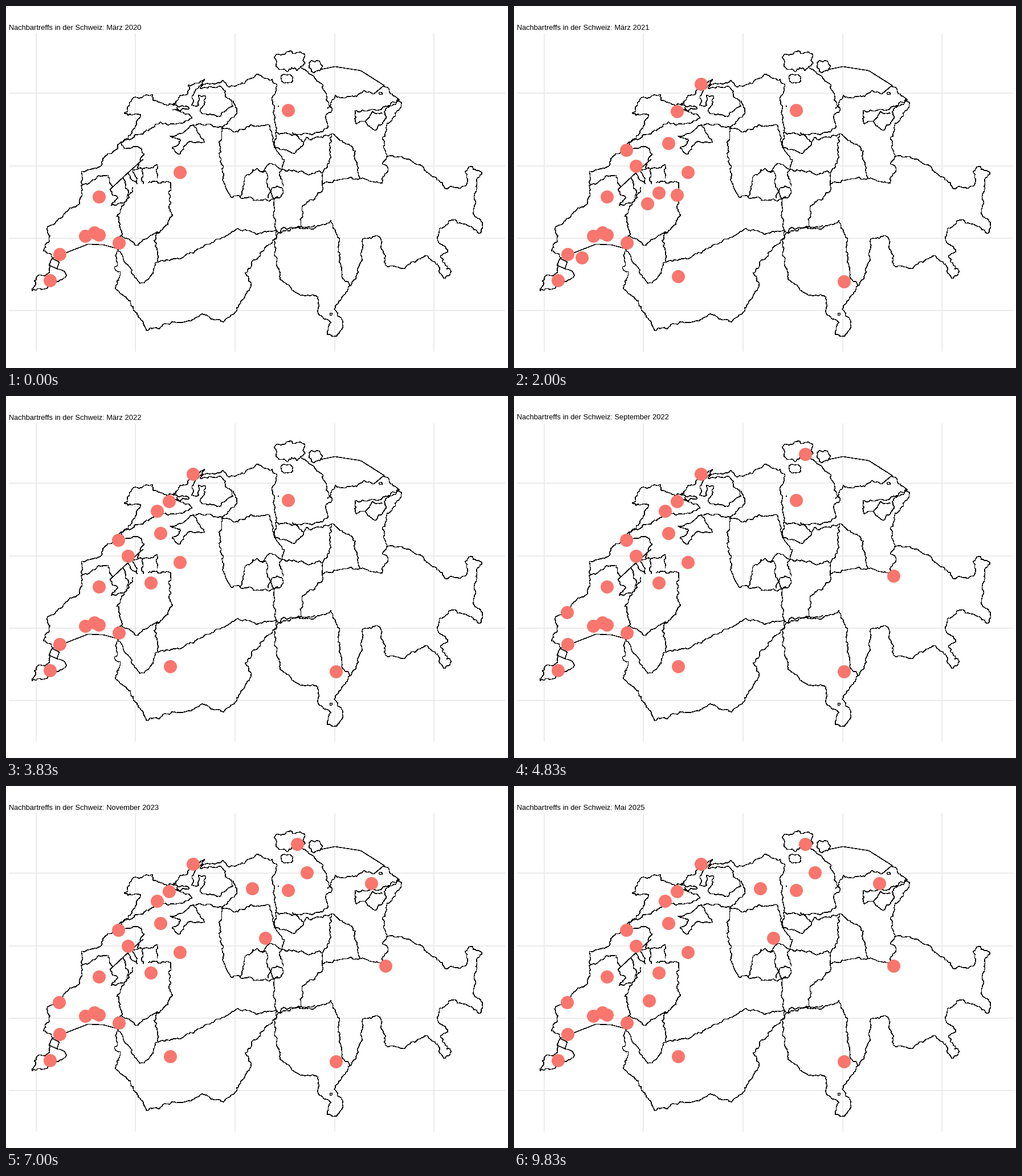
A matplotlib script for the animation above (10 s loop, 881 px wide and 636 px high).

```python
import matplotlib.pyplot as plt
import numpy as np
from matplotlib.animation import FuncAnimation
from matplotlib.collections import LineCollection

W, H, DPI = 881, 636, 100
TICKS, TICK_MS = 200, 50
STEPS = 60       # map updates per loop
LAST_MONTH = 62  # months from March 2020 to May 2025
PX = 72 / DPI
MONTHS = ("Januar Februar März April Mai Juni Juli August "
          "September Oktober November Dezember").split()

rng = np.random.default_rng(4)
paths = []


def meander(a, b):
    """Midpoint displacement from a to b, without the end point."""
    d = b - a
    length = np.hypot(*d)
    if length < 3.5:
        return [a]
    shift = np.clip(rng.normal(0, 0.16), -0.3, 0.3) * min(length, 11)
    mid = (a + b) / 2 + shift * np.array([-d[1], d[0]]) / length
    return meander(a, mid) + meander(mid, b)


def smooth(*xy):
    paths.append(np.array(xy, float).reshape(-1, 2) + 0.5)


def border(*xy):
    pts = np.array(xy, float).reshape(-1, 2)
    line = [p for a, b in zip(pts, pts[1:]) for p in meander(a, b)]
    smooth(*np.ravel(line + [pts[-1]]))


def blob(cx, cy, rx, ry, rough=0.12):
    """A closed district outline: an ellipse with a wobbling radius."""
    t = np.linspace(0, 2 * np.pi, 9 + (rx + ry) // 3)
    r = 1 + rng.uniform(-rough, rough, t.size)
    r[-1] = r[0]
    border(*np.ravel(np.column_stack([cx + rx * r * np.cos(t), cy + ry * r * np.sin(t)])))


# Geneva, Vaud, Neuchâtel
border(77, 454, 72, 470, 53, 476, 45, 500, 72, 495, 104, 477, 103, 468, 89, 461)
smooth(80, 443, 93, 449, 89, 461, 75, 455, 80, 443)
smooth(84, 442, 105, 433, 143, 418, 170, 419, 196, 426)
border(84, 442, 65, 430, 77, 403, 72, 388, 128, 342, 132, 290, 160, 284,
       174, 263, 205, 238)
border(131, 316, 165, 299, 179, 297, 187, 317)
smooth(182, 322, 213, 293, 240, 269)
border(205, 238, 207, 250, 233, 248, 242, 260, 230, 284, 265, 278, 265, 302)
border(182, 322, 196, 337, 184, 350, 206, 346, 215, 325, 205, 302)
border(213, 293, 230, 312, 222, 288, 240, 285, 241, 312)

# Fribourg and Valais
border(222, 318, 193, 369, 203, 402, 228, 420, 270, 396, 292, 367, 285, 326,
       289, 310, 249, 310)
border(203, 402, 193, 407, 196, 426, 234, 487, 249, 480, 266, 450, 262, 405, 270, 396)
border(196, 426, 190, 458, 200, 466, 191, 495, 208, 510, 218, 522, 247, 570,
       299, 556, 352, 542, 381, 555, 403, 537, 430, 487, 419, 468, 470, 410)
border(266, 450, 320, 435, 365, 414, 402, 393, 440, 401, 473, 393)

# Jura and the Basel region
border(205, 238, 229, 207, 236, 190, 207, 188, 222, 161, 257, 155, 258, 166,
       291, 172, 326, 197, 297, 207, 262, 207, 205, 238)
border(291, 182, 321, 179, 293, 171, 318, 154, 319, 138, 348, 128, 326, 157,
       325, 174, 338, 174)
border(340, 144, 380, 130, 388, 140, 418, 136, 437, 122, 474, 136)
border(338, 174, 337, 156, 350, 158, 340, 185, 377, 192, 398, 176, 381, 146, 340, 144)
border(398, 166, 405, 188, 378, 212)

# Solothurn, Bern, Lucerne, Obwalden
border(287, 228, 313, 220, 328, 208, 348, 239, 322, 237, 304, 260, 291, 249,
       306, 236, 287, 228)
border(328, 208, 355, 207, 378, 212, 380, 300, 393, 334, 464, 340, 476, 334)
border(378, 212, 402, 221, 430, 208, 461, 208, 473, 249)
border(410, 334, 418, 302, 440, 285, 456, 290, 464, 325, 460, 337)
border(447, 291, 462, 276, 484, 286, 480, 294, 486, 316)
blob(476, 327, 10, 11, 0.2)

# Zurich, Schaffhausen, Thurgau
border(474, 136, 467, 171, 474, 221, 518, 226, 565, 213, 561, 199, 572, 181,
       551, 135, 518, 108)
blob(498, 95, 25, 17, 0.25)
blob(543, 105, 10, 10, 0.3)
blob(492, 127, 10, 8, 0.2)
smooth(551, 111, 577, 106, 622, 113, 663, 139, 645, 154)
border(564, 180, 577, 156, 615, 159, 628, 148, 645, 154)
blob(657, 153, 3, 2)

# Eastern cantons
border(663, 139, 674, 154, 692, 168, 690, 182, 667, 211, 660, 232, 667, 265)
border(655, 182, 690, 164, 666, 180, 663, 201, 645, 217, 631, 203, 614, 207,
       612, 183, 655, 182)
border(631, 203, 643, 184, 660, 188)
border(474, 221, 472, 249, 505, 259, 522, 239, 502, 222)
border(522, 239, 526, 230, 571, 224, 567, 275, 555, 293, 523, 293, 484, 286,
       488, 270, 472, 249)
border(571, 224, 608, 248, 620, 303, 596, 303, 555, 312)
border(620, 303, 657, 311, 670, 285, 660, 276, 667, 265)
border(555, 293, 553, 326, 519, 355, 518, 387, 481, 399, 473, 393)
border(476, 334, 469, 370, 470, 410)

# Grisons and Ticino
border(667, 265, 694, 264, 731, 281, 769, 319, 808, 313, 805, 290, 817, 281,
       835, 294, 826, 310, 819, 364, 836, 380, 832, 398, 786, 375, 760, 390,
       757, 411, 775, 432, 762, 438, 781, 466, 768, 478)
border(768, 478, 761, 460, 738, 438, 691, 460, 665, 455, 655, 405, 626, 408,
       625, 446, 603, 491)
border(470, 410, 487, 388, 522, 391, 570, 376, 585, 410, 590, 478, 603, 491,
       577, 527, 590, 559, 580, 580, 563, 577, 570, 556, 546, 536, 547, 510,
       515, 507, 482, 481, 470, 410)
border(518, 387, 541, 385)
blob(570, 541, 2, 2)
smooth(477, 175, 478, 176)

# Places that join at a step and stay
JOINS = {
    0: [(77, 482), (94, 436), (139, 404), (155, 398), (163, 402), (198, 416),
        (163, 335), (305, 292), (495, 183)],
    3: [(328, 137), (286, 185), (197, 253), (214, 281), (271, 241), (288, 475), (579, 484)],
    10: [(254, 328)],
    18: [(265, 202)],
    27: [(93, 380), (666, 316), (511, 102)],
    30: [(528, 152), (641, 171), (455, 267)],
    39: [(432, 180)],
    57: [(237, 377)],
}
# Places that take part only for a while: steps -> positions
VISITS = {
    (4, 7): [(275, 417), (411, 451), (87, 455)],
    (11, 14): [(234, 347), (286, 332), (119, 442)],
    (48, 53): [(245, 252)],
}

fig = plt.figure(figsize=(W / DPI, H / DPI), dpi=DPI, facecolor="white")
ax = fig.add_axes([0, 0, 1, 1])
ax.set(xlim=(0, W), ylim=(H, 0))
ax.axis("off")

grid = [[(x + 0.5, 48), (x + 0.5, 607)] for x in (52, 226, 401, 576, 750)]
grid += [[(5, y + 0.5), (876, y + 0.5)] for y in (152, 280, 407, 534)]
for lines, color in ((grid, "#ebebeb"), (paths, "black")):
    ax.add_collection(LineCollection(lines, colors=color, linewidths=0.4 * PX,
                                     antialiaseds=False))
dots = ax.scatter([], [], s=(23 * PX) ** 2, c="#f8766d", linewidths=0,
                  antialiased=False, zorder=3)
title = ax.text(5, 41.5, "", family="Liberation Sans", size=12.9 * PX,
                color="black", va="baseline")


def draw(tick):
    step = min((tick + 1) * TICK_MS * STEPS // (TICKS * TICK_MS), STEPS - 1)
    month = step * LAST_MONTH // (STEPS - 1) + 2
    title.set_text(f"Nachbartreffs in der Schweiz: {MONTHS[month % 12]} {2020 + month // 12}")
    live = [p for start, places in JOINS.items() if start <= step for p in places]
    live += [p for (on, off), places in VISITS.items() if on <= step < off for p in places]
    dots.set_offsets(live)
    return dots, title


anim = FuncAnimation(fig, draw, frames=TICKS, interval=TICK_MS,
                     repeat=True, repeat_delay=0)
plt.show()
```
